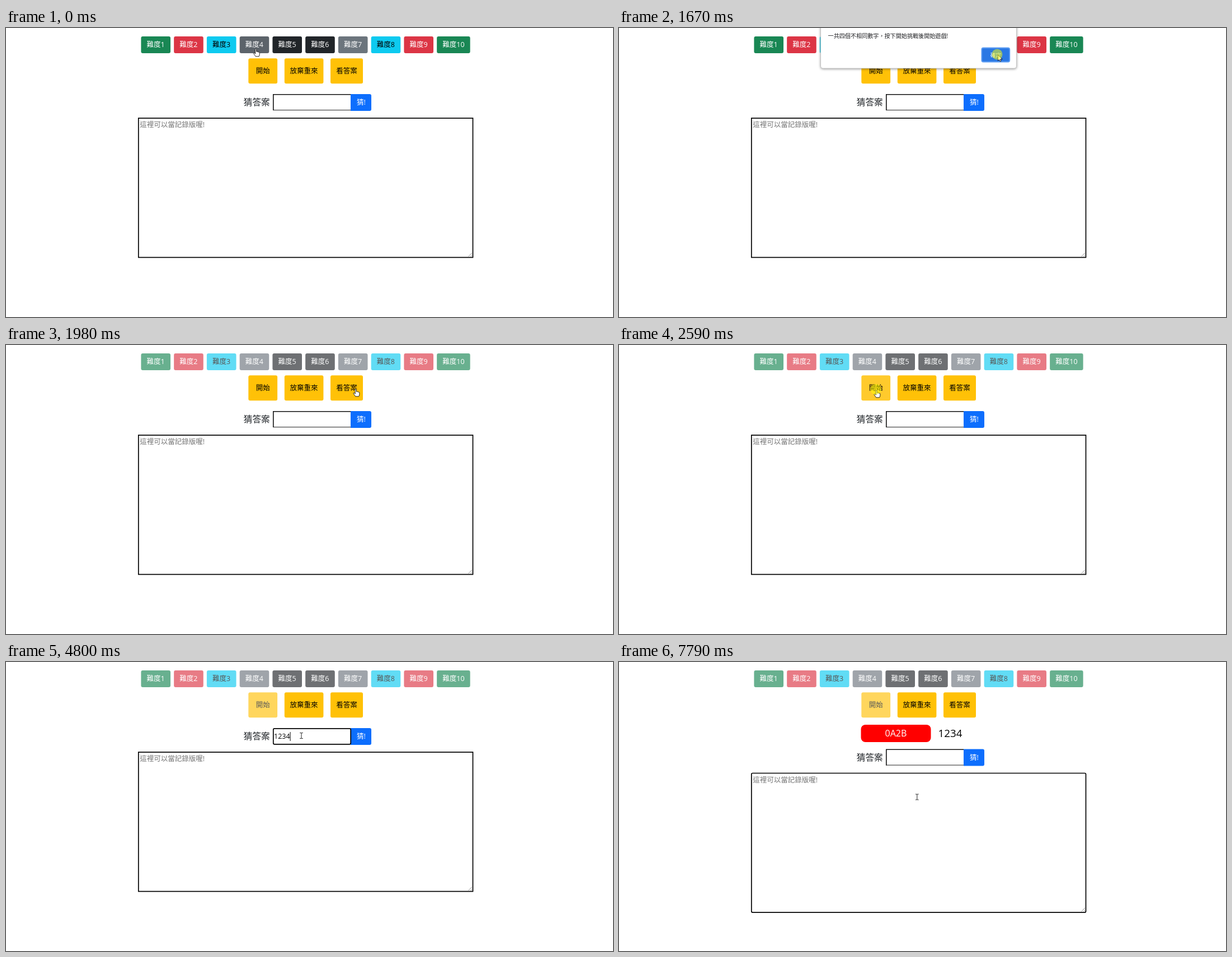
Write an HTML page that moves like this. It is 1085 px wide and 516 px high and loops after 8000 ms.

```html
<!DOCTYPE html>
<html lang="zh-Hant">
<head>
<meta charset="utf-8">
<style>
  html, body { margin: 0; width: 100%; height: 100%; overflow: hidden; background: #fff; }
  svg { display: block; width: 1085px; height: 516px; }
  text { font: 12.5px 'Open Sans', 'Noto Sans CJK TC', 'Noto Sans CJK', sans-serif; white-space: pre; }
  .mid { text-anchor: middle; }
  #dialog > rect:first-child { filter: drop-shadow(0 1px 2px rgba(0, 0, 0, .4)); }
</style>
</head>
<body>
<svg viewBox="0 0 1085 516">
  <g id="levels"></g>
  <g id="actions"></g>
  <g id="result">
    <rect x="432.5" y="112" width="125" height="31" rx="8" fill="#f00"/>
    <text class="mid" x="495" y="133" fill="#fff" style="font-size:16px">0A2B</text>
    <text x="570.5" y="134" style="font-size:18.8px">1234</text>
  </g>
  <g id="form">
    <text x="424.8" y="138.2" fill="#212529" style="font-size:15.6px">猜答案</text>
    <rect id="ring" x="614.8" y="116.8" width="39.4" height="32.4" rx="4" fill="none" stroke="#86b6fe" stroke-width="2.4"/>
    <g id="plainBox">
      <path d="M477 118.8H616M477.8 118V147" stroke="#111" stroke-width="1.6"/>
      <path d="M477 146.6H616" stroke="#222"/>
    </g>
    <path id="guess" d="M616 118H650a3 3 0 0 1 3 3V145a3 3 0 0 1 -3 3H616Z"/>
    <rect id="focusBox" x="477.8" y="118.8" width="138.4" height="28" rx="2" fill="none" stroke="#000" stroke-width="1.7"/>
    <text class="mid" x="634.8" y="137.2" fill="#fff">猜!</text>
    <text id="typed" x="479" y="137.4"></text>
    <rect id="caret" y="125" width="1" height="16"/>
    <rect id="notes" x="236.8" y="161" width="597.7" height="248.6" fill="#fff" stroke="#000" stroke-width="1.7"/>
    <text x="239.2" y="177.3" fill="#757575">這裡可以當記錄版喔!</text>
    <path d="M826.5 408L833 401.5M830.5 408L833 405.5" stroke="#888" stroke-width=".9"/>
    <rect id="notesCaret" x="239" y="165" width="1" height="16"/>
  </g>
  <g id="dialog">
    <rect x="360.5" y="-10" width="350" height="82" rx="4" fill="#fff" stroke="#bbb" stroke-width=".8"/>
    <text x="373.6" y="17.9" fill="#202124" style="font-size:10.1px">一共四個不相同數字，按下開始挑戰後開始遊戲!</text>
    <rect x="648.3" y="35.5" width="50" height="25" rx="3" fill="#2a78e4" stroke="#5f9ef3" stroke-width="1.8"/>
    <text class="mid" x="673.4" y="51.5" fill="#fff" style="font-size:9.6px">確定</text>
  </g>
  <g id="cursor" stroke-linejoin="round" stroke-linecap="round">
    <path id="hand" fill="#fff" stroke="#111" stroke-width=".9"
      d="M-1 1.2Q0 -.6 1.1 1.2V5.2Q2.2 4.4 3.2 5.6Q4.4 5 5.1 6.2Q6.7 5.8 6.8 7.4V10.2Q6.6 12 5.6 13.8H-.3Q-2 11.4 -3.8 8.8Q-4.2 7.2 -2.8 7.3L-1 8.8Z"/>
    <path id="arrow" fill="#fff" stroke="#111" stroke-width=".9"
      d="M.3 0V10.6L2.7 8.4L4.2 11.9L6 11.1L4.5 7.8H7.8Z"/>
    <path id="beam" fill="none" stroke="#222" stroke-width="1"
      d="M-2.4 -5H-.7L0 -4.4L.7 -5H2.4M0 -4.4V4.4M-2.4 5H-.7L0 4.4L.7 5H2.4"/>
  </g>
  <circle id="click" r="9.5" fill="#ff0" fill-opacity=".5"/>
</svg>
<script>
const LOOP = 8000;
const $ = id => document.getElementById(id);

function addButton(parent, x, y, w, h, fill, color, label) {
  const g = document.createElementNS('http://www.w3.org/2000/svg', 'g');
  g.innerHTML = `<rect x="${x}" y="${y}" width="${w}" height="${h}" rx="3" fill="${fill}"/>
    <text class="mid" x="${x + w / 2}" y="${y + h / 2 + 4.4}" fill="${color}">${label}</text>`;
  parent.append(g);
  return g;
}

const GREEN = '#198754', RED = '#dc3545', CYAN = '#0dcaf0', GREY = '#6c757d', DARK = '#212529';
const levels = [GREEN, RED, CYAN, GREY, DARK, DARK, GREY, CYAN, RED, GREEN].map((fill, i) =>
  addButton($('levels'), 241.4 + i * 58.75, 15, i === 9 ? 59.5 : 52.6, 30, fill,
    fill === CYAN ? '#000' : '#fff', '難度' + (i + 1)));
const [start] = [[433.3, 51.8, '開始'], [497.8, 69.6, '放棄重來'], [580, 58, '看答案']].map(([x, w, label]) =>
  addButton($('actions'), x, 54.3, w, 45, '#ffc107', '#000', label));

// Step tables: [time, value]
const cursorKind = [[0, 'hand'], [820, 'arrow'], [1980, 'hand'], [2670, 'arrow'], [2920, 'beam'],
  [5800, 'hand'], [6110, 'arrow'], [6260, 'hand'], [6330, 'beam']];
const dialogAlpha = [[0, 0], [740, .5], [820, .9], [900, 1], [1830, .5], [1900, 0]];
const typing = [[0, ''], [4250, '1'], [4330, '12'], [4410, '123'], [4800, '1234'], [6110, '']];
const guessFill = [[0, '#0d6efd'], [5800, '#0c66ea'], [5880, '#0b5ed7'], [6330, '#0c66ea'], [6410, '#0d6efd']];

// Spans: [from, to]
const clicks = [[660, 820], [1670, 1760], [2590, 2670], [3080, 3230], [6050, 6110], [7110, 7190]];
const caretOn = [[3080, 3630], [4170, 5330], [5800, 6050]];

// Cursor moves: [first step, last step, steps, x, y]
const origin = [446.5, 37];
const moves = [
  [1060, 1600, 8, 677, 48],
  [1830, 1980, 3, 625, 78],
  [2050, 2360, 5, 460, 80],
  [2760, 3000, 4, 528, 131.5],
  [5650, 5880, 4, 638.5, 134],
  [6190, 6410, 4, 620, 226],
  [6640, 6810, 3, 536, 241],
  [7790, 7791, 1, 532.8, 241]
];

const at = (table, t) => table.reduce((v, [time, next]) => t >= time ? next : v, table[0][1]);
const during = (spans, t) => spans.some(([a, b]) => t >= a && t < b);
const show = (el, on) => el.setAttribute('visibility', on ? 'visible' : 'hidden');

function cursorAt(t) {
  let [x, y] = origin;
  for (const [a, b, n, tx, ty] of moves) {
    if (t < a) break;
    const k = Math.min(n, Math.floor((t - a) / (b - a) * (n - 1) + .05) + 1) / n;
    const e = k * k * (3 - 2 * k);
    x += (tx - x) * e;
    y += (ty - y) * e;
  }
  return [x, y];
}

function draw(t) {
  levels.forEach(g => g.setAttribute('opacity', t < 1830 ? 1 : .65));
  levels[3].firstChild.setAttribute('fill', t < 1830 ? '#5c636a' : GREY);
  start.setAttribute('opacity', t < 2670 ? 1 : .65);
  start.firstChild.setAttribute('fill', t >= 2360 && t < 2670 ? '#ffca2c' : '#ffc107');

  $('dialog').setAttribute('opacity', at(dialogAlpha, t));

  const guessed = t >= 6110;
  show($('result'), guessed);
  $('form').setAttribute('transform', `translate(0 ${guessed ? 37.5 : 0})`);

  const focused = t >= 3080 && t < 6050;
  show($('focusBox'), focused);
  show($('plainBox'), !focused);
  show($('ring'), t >= 6050 && t < 7110);
  $('guess').setAttribute('fill', at(guessFill, t));

  const text = at(typing, t);
  $('typed').textContent = text;
  $('caret').setAttribute('x', 479 + text.length * 7.15);
  show($('caret'), during(caretOn, t));
  $('notes').setAttribute('rx', t >= 7110 ? 2 : 0);
  show($('notesCaret'), t >= 7110 && t < 7650);

  const [x, y] = cursorAt(t);
  const kind = at(cursorKind, t);
  $('cursor').setAttribute('transform', `translate(${x} ${y})`);
  for (const id of ['hand', 'arrow', 'beam']) show($(id), id === kind);
  $('click').setAttribute('transform', `translate(${x - 1} ${y - 1})`);
  show($('click'), during(clicks, t));
}

const begin = performance.now();
function frame() {
  draw((performance.now() - begin) % LOOP);
  requestAnimationFrame(frame);
}
frame();
</script>
</body>
</html>
```
